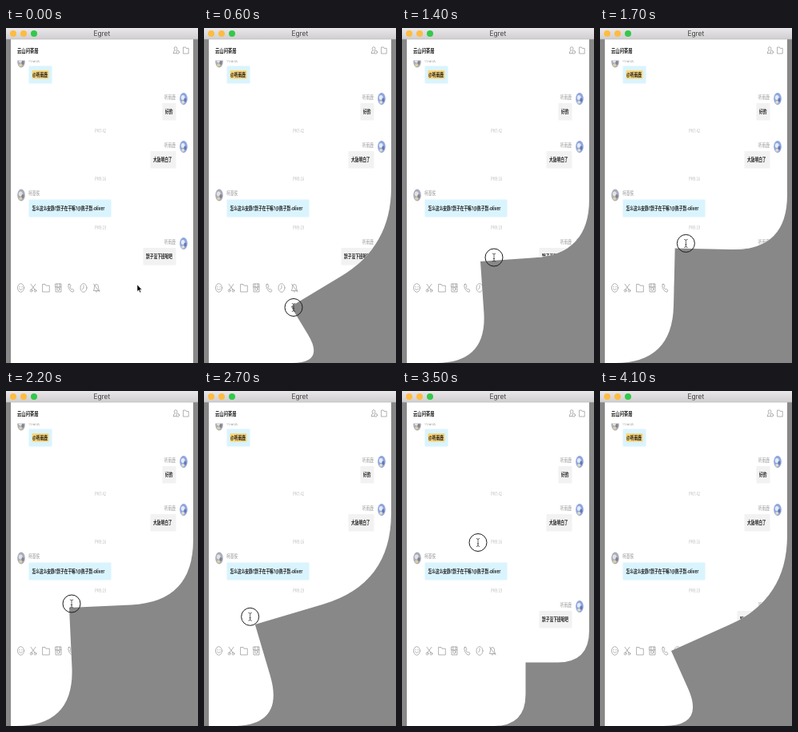
An HTML page for the animation above (4200 ms loop, 240 by 419 pixels).

```html
<!DOCTYPE html>
<html lang="zh">
<head>
<meta charset="utf-8">
<title>Page fold</title>
<style>
  html, body { margin: 0; width: 100%; height: 100%; overflow: hidden; background: #888; }
  svg { display: block; width: 240px; height: 419px; }
  text { font: bold 6.4px "Noto Sans CJK SC", "Noto Sans CJK", "Noto Sans", sans-serif; fill: #1c1c1c; }
  .head { font-size: 7.2px; }
  .name { font-size: 6.4px; font-weight: 400; fill: #999; }
  .time { font-size: 5.6px; font-weight: 400; fill: #bdbdbd; }
  .bar { font: 8.3px Inter, "Liberation Sans", sans-serif; fill: #444; }
  .icons { fill: none; stroke: #808080; stroke-width: .6; stroke-linejoin: round; stroke-linecap: round; }
</style>
</head>
<body>
<svg viewBox="0 0 240 419">
  <defs>
    <clipPath id="fold"><path id="edge"/></clipPath>
    <clipPath id="list"><rect x="6" y="40.5" width="228" height="379"/></clipPath>
    <linearGradient id="chrome" x2="0" y2="1">
      <stop stop-color="#e9e7e9"/><stop offset="1" stop-color="#d0ced0"/>
    </linearGradient>
  </defs>
  <rect width="240" height="419" fill="#888"/>
  <g clip-path="url(#fold)">
    <rect x="6" y="14" width="228" height="405" fill="#fff"/>
    <g id="header"></g>
    <g id="chat" clip-path="url(#list)"></g>
    <g class="icons">
      <path d="M209.5 31.5v-1.2q0-1.8 2-2.2q-1.3-1-1.3-2.4q0-2 1.9-2t1.9 2q0 1.4-1.2 2.4M209.5 31.5h3.5"/>
      <ellipse cx="214.8" cy="30.2" rx="1.7" ry="2"/>
      <path d="M222 24h2.4l.8 1.4h3V32H222z"/>
      <g transform="translate(18.5 325)">
        <ellipse rx="4" ry="5.3"/><path d="M-1.5-1.6v.7M1.5-1.6v.7M-2 1.4q2 2.4 4 0"/>
      </g>
      <g transform="translate(34 325)">
        <path d="M-3-4.7L2 2.2M3-4.7L-2 2.2"/>
        <ellipse cx="-2.5" cy="3.5" rx="1.3" ry="1.6"/><ellipse cx="2.5" cy="3.5" rx="1.3" ry="1.6"/>
      </g>
      <path d="M46 320.5h3l1 1.7h4.3v7.8H46z"/>
      <g transform="translate(65.5 325)">
        <path d="M-3.5-5h7v4h-7zM-3.5-1v6h7v-6M-1.7-5v4M1.7-5v4"/><ellipse cy="1.5" rx="1.6" ry="2"/>
      </g>
      <path d="M78.2 320.7l1.4-.7 1.3 2.8-1 1.3q.7 2 2.2 3.2l1.1-1 1.8 1.8-1 2q-2.3 1-4.8-3.2t-1-6.2z"/>
      <g transform="translate(97 325)"><ellipse rx="4" ry="5.3"/><path d="M0-3V.5L-1.6 1.7"/></g>
      <g transform="translate(113 325)">
        <path d="M-3.5 3.2Q-2.5 2-2.5-1q0-3.5 2.5-3.5T2.5-1q0 3 1 4.2zM-1 4.8q1 .8 2 0M-3.5-4.8L3.8 5"/>
      </g>
    </g>
  </g>
  <rect width="240" height="14" fill="url(#chrome)"/>
  <path d="M0 14h240" stroke="#b5b3b5" stroke-width=".6"/>
  <circle cx="9" cy="7" r="4" fill="#fdbc40"/>
  <circle cx="22" cy="7" r="4" fill="#fdbc40"/>
  <circle cx="35" cy="7" r="4" fill="#34c84a"/>
  <text class="bar" x="119.8" y="10.3" text-anchor="middle">Egret</text>
  <path id="arrow" d="M0 0v8.6l2-1.8 1.5 3.2 1.3-.7-1.5-3h2.5z" fill="#000" stroke="#fff" stroke-width=".5"/>
  <g id="beam" fill="none" stroke="#1c1c1c">
    <circle r="11"/>
    <path d="M-2.2-5Q0-5 0-3.5Q0-5 2.2-5M0-3.5v7M-2.2 5Q0 5 0 3.5Q0 5 2.2 5M-1.2 1.5h2.4" stroke-width=".65"/>
  </g>
</svg>
<script>
const $ = id => document.getElementById(id);

// The whole chat view is narrowed horizontally.
const SQUEEZE = 0.74;
const label = (x, y, str, cls = '', anchor = 'start') =>
  `<text class="${cls}" text-anchor="${anchor}" transform="translate(${x} ${y}) scale(${SQUEEZE} 1)">${str}</text>`;
const box = (x, y, w, h, fill) =>
  `<rect x="${x}" y="${y}" width="${w}" height="${h}" rx="1" fill="${fill}"/>`;
const avatar = (x, y, [base, light, dark, warm]) => `<g transform="translate(${x} ${y})">
  <ellipse rx="4.8" ry="7.5" fill="${base}"/>
  <ellipse cx="-.8" cy="-1.5" rx="2.4" ry="3" fill="${light}"/>
  <ellipse cx="2" cy="1.5" rx="1.6" ry="2.4" fill="${dark}"/>
  <ellipse cx="-.8" cy="4.4" rx="2" ry="1.8" fill="${warm}"/></g>`;

const BLUE = ['#8fa6dc', '#e4eaf5', '#6577b8', '#e3dcc0'];
const GREY = ['#a9adba', '#e2e1e4', '#85818d', '#dccf9c'];
const ME = '听雨鹿', OTHER = '柯基侯';

const sent = (y, x, str) =>
  label(212, y, ME, 'name', 'end') + avatar(222, y - .5, BLUE) +
  box(x, y + 5, 212.5 - x, 21.5, '#f2f2f2') + label(x + 3.5, y + 18.3, str);
const received = (y, w, body) =>
  label(28, y, OTHER, 'name') + avatar(19, y, GREY) + box(28.5, y + 5.5, w, 22, '#daf4fe') + body;
const stamp = (y, str) => label(118, y, str, 'time', 'middle');

$('header').innerHTML = label(14, 31, '云山问茶居', 'head');
$('chat').innerHTML = [
  received(42, 29, box(32.5, 53, 21, 10.5, '#fbd679') + label(33, 60.8, '@' + ME)),
  sent(89, 195.5, '好的'),
  stamp(131, 'PM7:42'),
  sent(149, 180.5, '大致明白了'),
  stamp(191, 'PM9:16'),
  received(209, 103, label(32.5, 228, '怎么这么安静?默子在干嘛?@陈子默-oliver')),
  stamp(252, 'PM9:19'),
  sent(270, 171.5, '默子没下班呢吧')
].join('');

// Keys are [ms, x, y].
const CORNER = [
  [0, 234, 419], [300, 166, 332], [1000, 63, 373], [1400, 98, 292],
  [2200, 79, 271], [3100, 57, 318], [3500, 154.5, 339.5], [4100, 89, 325]
];
const POINTER = [
  [0, 164, 321], [200, 164, 321], [1000, 60, 378], [1400, 115, 287],
  [2200, 82, 266], [3100, 47, 294], [3500, 95, 189.5], [4100, 95, 230]
];
const LOOP = 4200, STEP = 100;

// Smooth curve through the keys, with slopes taken from the neighbours.
function along(keys, t) {
  const last = keys.length - 1;
  let i = 0;
  while (i < last - 1 && t >= keys[i + 1][0]) i++;
  const p = keys[i], q = keys[i + 1], span = q[0] - p[0];
  const u = Math.min(1, (t - p[0]) / span);
  const slope = (n, c) => {
    if (n === 0 || n === last) return 0;
    const before = keys[n - 1], after = keys[n + 1];
    if ((keys[n][c] - before[c]) * (after[c] - keys[n][c]) <= 0) return 0;
    return (after[c] - before[c]) / (after[0] - before[0]) * span;
  };
  const u2 = u * u, u3 = u2 * u;
  return [1, 2].map(c =>
    (2 * u3 - 3 * u2 + 1) * p[c] + (u3 - 2 * u2 + u) * slope(i, c) +
    (3 * u2 - 2 * u3) * q[c] + (u3 - u2) * slope(i + 1, c));
}

// Page outline when the bottom right corner is pulled to (ax, ay).
function outline(ax, ay) {
  const fx = 234, fy = 419;
  if (fx - ax < 1 || fy - ay < 1) return `M6 14H${fx}V${fy}H6z`;
  const gx = (ax + fx) / 2, gy = (ay + fy) / 2;
  const ex = gx - (fy - gy) ** 2 / (fx - gx);
  const hy = gy - (fx - gx) ** 2 / (fy - gy);
  const cx = ex - (fx - ex) / 2, jy = hy - (fy - hy) / 2;
  return `M6 ${Math.min(0, jy)}H${fx}V${jy}Q${fx} ${hy} ${(ax + fx) / 2} ${(ay + hy) / 2}` +
    `L${ax} ${ay}L${(ax + ex) / 2} ${(ay + fy) / 2}Q${ex} ${fy} ${cx} ${fy}H6z`;
}

function draw(now) {
  const t = Math.floor(now % LOOP / STEP) * STEP;
  $('edge').setAttribute('d', outline(...along(CORNER, t)));
  const place = `translate(${along(POINTER, t)})`;
  for (const [id, shown] of [['arrow', t < 100], ['beam', t >= 100 && t < 3900]]) {
    $(id).setAttribute('transform', place);
    $(id).style.display = shown ? '' : 'none';
  }
}

const start = performance.now();
function tick() {
  draw(performance.now() - start);
  requestAnimationFrame(tick);
}
tick();
</script>
</body>
</html>
```
